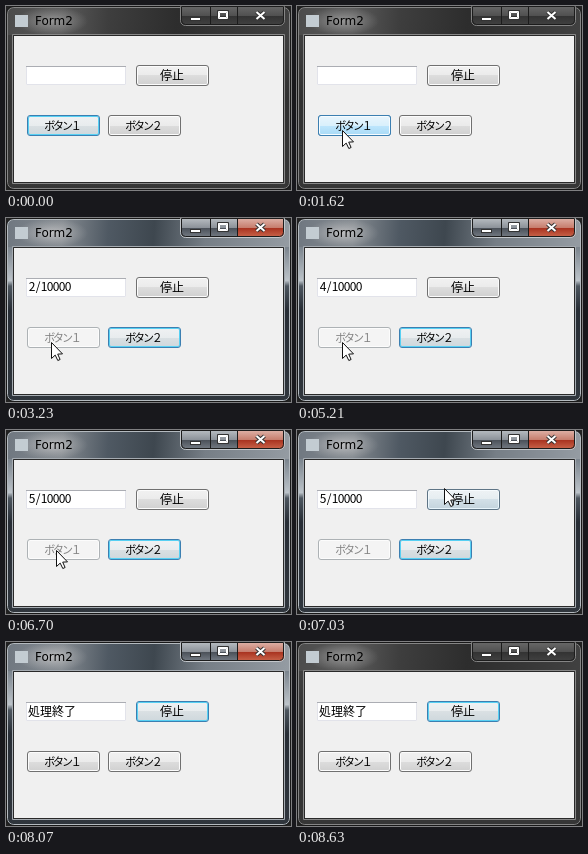
Animation of 285x184 px, one loop 8730 ms. Source, as an HTML page with a canvas:

```html
<!DOCTYPE html>
<html lang="ja">
<head>
<meta charset="utf-8">
<title>Form2</title>
<style>
html, body { margin: 0; width: 100%; height: 100%; overflow: hidden; background: #222; }
canvas { display: block; width: 285px; height: 184px; }
</style>
</head>
<body>
<canvas id="stage" width="285" height="184"></canvas>
<script>
const ctx = document.getElementById('stage').getContext('2d');
const LOOP = 8730;
const JP = '"Noto Sans CJK JP", "Noto Sans CJK", sans-serif';
const BUTTON_W = 73, BUTTON_H = 21;
const ACTIVATE = 2080, START = 2260, PRESS_STOP = 7240, STOPPED = 7300, DEACTIVATE = 8630;
const TICKS = [3230, 4250, 5210, 6200];

// start, end and number of pointer updates
const MOVES = [[1150, 1330, 5], [1520, 1620, 3], [6700, 7360, 12], [7690, 8070, 9]];
// time, x, y of the pointer tip
const PATH = [
  [1150, 39, 176], [1240, 42, 150], [1330, 45, 131],
  [1520, 45, 129], [1620, 45, 124],
  [6700, 50, 120], [6820, 87, 92], [6940, 131, 62], [7000, 147, 58], [7120, 156, 66], [7180, 157, 69],
  [7690, 165, 74], [7880, 215, 112], [8022, 276, 156], [8070, 290, 165]
];

const STYLES = {
  normal: { edge: '#707070', inner: '#fcfcfc', fill: ['#f2f2f2', '#ebebeb', '#dddddd', '#cfcfcf'] },
  focus: { edge: '#3c7fb1', inner: '#57d0f3', fill: ['#f0f2f3', '#e8ecee', '#dae0e3', '#cdd7dc'] },
  hover: { edge: '#3c7fb1', inner: '#f6fcff', fill: ['#eaf6fd', '#d9f0fc', '#bee6fd', '#a7d9f5'] },
  pressed: { edge: '#2c628b', inner: '#9eb0ba', fill: ['#e5f4fc', '#c4e5f6', '#98d1ef', '#68b3db'] },
  disabled: { edge: '#adb2b5', inner: '#fcfcfc', fill: ['#f4f4f4', '#f4f4f4', '#f4f4f4', '#f4f4f4'] }
};

const clamp = v => Math.max(0, Math.min(1, v));
const fade = (t, from, to) => clamp((t - from) / (to - from));

function rect(x, y, w, h, fill) {
  ctx.fillStyle = fill;
  ctx.fillRect(x, y, w, h);
}

function outline(x, y, w, h, color, radius = 0) {
  ctx.beginPath();
  ctx.roundRect(x + .5, y + .5, w - 1, h - 1, radius);
  ctx.strokeStyle = color;
  ctx.lineWidth = 1;
  ctx.stroke();
}

function gradient(x0, y0, x1, y1, stops) {
  const g = ctx.createLinearGradient(x0, y0, x1, y1);
  stops.forEach(([at, color]) => g.addColorStop(at, color));
  return g;
}

function label(str, x, y, font, color = '#000', align = 'left', spacing = 0) {
  ctx.font = font;
  ctx.fillStyle = color;
  ctx.textAlign = align;
  ctx.letterSpacing = spacing + 'px';
  ctx.fillText(str, x, y);
  ctx.letterSpacing = '0px';
}

function halves(y, h, c) {
  return gradient(0, y, 0, y + h, [[0, c[0]], [.5, c[1]], [.5, c[2]], [1, c[3]]]);
}

function face(x, y, name, alpha = 1) {
  const s = STYLES[name];
  ctx.globalAlpha = alpha;
  rect(x + 1, y + 1, BUTTON_W - 2, BUTTON_H - 2, halves(y, BUTTON_H, s.fill));
  outline(x + 1, y + 1, BUTTON_W - 2, BUTTON_H - 2, s.inner, 1.5);
  outline(x, y, BUTTON_W, BUTTON_H, s.edge, 2.5);
  ctx.globalAlpha = 1;
}

function button(x, y, str, base, hover = 0, spacing = 0) {
  face(x, y, base);
  if (hover) face(x, y, 'hover', hover);
  const size = spacing ? 11 : 12;
  label(str, x + 36 + spacing / 2, y + 15, `${size}px ${JP}`,
    base === 'disabled' ? '#838383' : '#000', 'center', spacing);
}

function captionButtons(active) {
  const shades = active ? ['#b4b9be', '#8b9198', '#4a5058', '#747b84'] : ['#666', '#505050', '#333', '#414141'];
  const reds = ['#dcae a3'.replace(' ', ''), '#c67c6c', '#a8321f', '#c9644a'];
  ctx.save();
  ctx.beginPath();
  ctx.roundRect(176, 1, 102, 18, [0, 0, 4, 4]);
  ctx.clip();
  rect(176, 1, 55, 18, halves(1, 18, shades));
  rect(231, 1, 47, 18, halves(1, 18, active ? reds : shades));
  ctx.restore();
  outline(174, 0, 105, 20, active ? '#c3c7cb' : '#858585', [0, 0, 5, 5]);
  outline(175, 0, 103, 19, '#1c1c1c', [0, 0, 4, 4]);
  [204, 231].forEach(x => rect(x, 1, 1, 17, '#1c1c1c'));

  rect(184, 11, 11, 4, '#333');
  rect(185, 12, 9, 2, '#fff');
  outline(211, 4, 12, 10, '#333');
  outline(212, 5, 10, 8, '#fff');
  outline(213, 6, 8, 6, '#fff');
  for (const [color, width] of [['#333', 4], ['#fff', 2]]) {
    ctx.beginPath();
    ctx.moveTo(250.5, 6); ctx.lineTo(258.5, 13);
    ctx.moveTo(258.5, 6); ctx.lineTo(250.5, 13);
    ctx.strokeStyle = color;
    ctx.lineWidth = width;
    ctx.stroke();
  }
}

function windowFrame(active) {
  rect(0, 0, 285, 184, '#222');
  ctx.save();
  ctx.beginPath();
  ctx.roundRect(1, 1, 283, 182, 6);
  ctx.clip();
  rect(0, 0, 285, 184, active
    ? gradient(0, 0, 0, 184, [[0, '#68717a'], [.16, '#7c858e'], [.34, '#bcc3c9'], [.37, '#4d565f'], [.5, '#272d35'], [1, '#30363d']])
    : gradient(0, 0, 0, 184, [[0, '#484848'], [.2, '#3e3e3e'], [.5, '#303030'], [1, '#363636']]));
  rect(0, 0, 285, 29, active
    ? gradient(0, 0, 285, 20, [[0, '#6f7780'], [.2, '#848a90'], [.36, '#4f5963'], [.52, '#3e474f'], [.7, '#767e86'], [1, '#959ca3']])
    : gradient(0, 0, 285, 20, [[0, '#4b4b4b'], [.2, '#595959'], [.36, '#3e3e3e'], [.6, '#2d2d2d'], [1, '#414141']]));
  const glow = ctx.createRadialGradient(0, 0, 2, 0, 0, 36);
  glow.addColorStop(0, active ? 'rgba(222,219,218,.6)' : 'rgba(205,205,205,.5)');
  glow.addColorStop(1, 'rgba(200,200,200,0)');
  ctx.translate(46, 15);
  ctx.scale(1, .4);
  rect(-46, -36, 92, 72, glow);
  ctx.restore();

  outline(1, 1, 283, 182, active ? '#b4babf' : '#858585', 6);
  outline(0, 0, 285, 184, '#181818', 7);
  outline(6, 28, 273, 150, active ? '#a5abb1' : '#888');
  outline(7, 29, 271, 148, '#292929');
  rect(8, 30, 269, 146, '#f0f0f0');

  rect(9, 9, 13, 12, '#c3ccd2');
  label('Form2', 29, 19, '12px "DejaVu Sans", sans-serif');
  captionButtons(active);
}

function textBox(t) {
  rect(20, 60, 100, 19, '#fff');
  outline(20, 60, 100, 19, '#e2e3ea');
  rect(20, 60, 100, 1, '#abadb3');
  if (t < START) return;
  if (t >= STOPPED) {
    label('処理終了', 22, 74, `12px ${JP}`);
    return;
  }
  const count = 1 + TICKS.filter(at => t >= at).length;
  [...`${count}/10000`].forEach((ch, i) => label(ch, 26 + 6 * i, 73, `12px ${JP}`, '#000', 'center'));
}

// Latest pointer update at or before t
function snap(t) {
  let at = 0;
  for (const [start, end, steps] of MOVES) {
    if (t < start) break;
    const gap = (end - start) / (steps - 1);
    at = Math.min(end, start + Math.floor((t - start) / gap + 1e-6) * gap);
  }
  return at;
}

function pointer(t) {
  if (t < PATH[0][0] || t >= 8069) return;
  const i = PATH.findIndex(p => p[0] > t);
  const a = PATH[i - 1], b = PATH[i], k = fade(t, a[0], b[0]);
  const x = Math.round(a[1] + (b[1] - a[1]) * k);
  const y = Math.round(a[2] + (b[2] - a[2]) * k);
  ctx.save();
  ctx.translate(x + .5, y + .5);
  ctx.beginPath();
  [[0, 0], [0, 16], [3.7, 12.6], [6.3, 18], [8.6, 17], [6.2, 11.6], [11, 11.4]].forEach(p => ctx.lineTo(...p));
  ctx.closePath();
  ctx.fillStyle = '#fff';
  ctx.fill();
  ctx.strokeStyle = '#111';
  ctx.lineWidth = 1;
  ctx.stroke();
  ctx.restore();
}

function draw(t) {
  const at = snap(t);
  windowFrame(t >= ACTIVATE && t < DEACTIVATE);
  textBox(t);

  const first = t < ACTIVATE ? 'focus' : t < START ? 'pressed' : t < STOPPED ? 'disabled' : 'normal';
  const firstHover = t < ACTIVATE ? fade(at, 1470, 1620) : 0;
  const second = t >= START && t < PRESS_STOP ? 'focus' : 'normal';
  const stop = t < PRESS_STOP ? 'normal' : t < STOPPED ? 'pressed' : 'focus';
  const stopHover = stop === 'pressed' ? 0 : fade(at, 6940, 7120) * (1 - fade(at, 7690, 8022));

  button(130, 59, '停止', stop, stopHover);
  button(21, 109, 'ボタン１', first, firstHover, -2.2);
  button(102, 109, 'ボタン２', second, 0, -2.2);
  pointer(at);
}

function tick() {
  draw(performance.now() % LOOP);
  requestAnimationFrame(tick);
}
tick();
</script>
</body>
</html>
```
